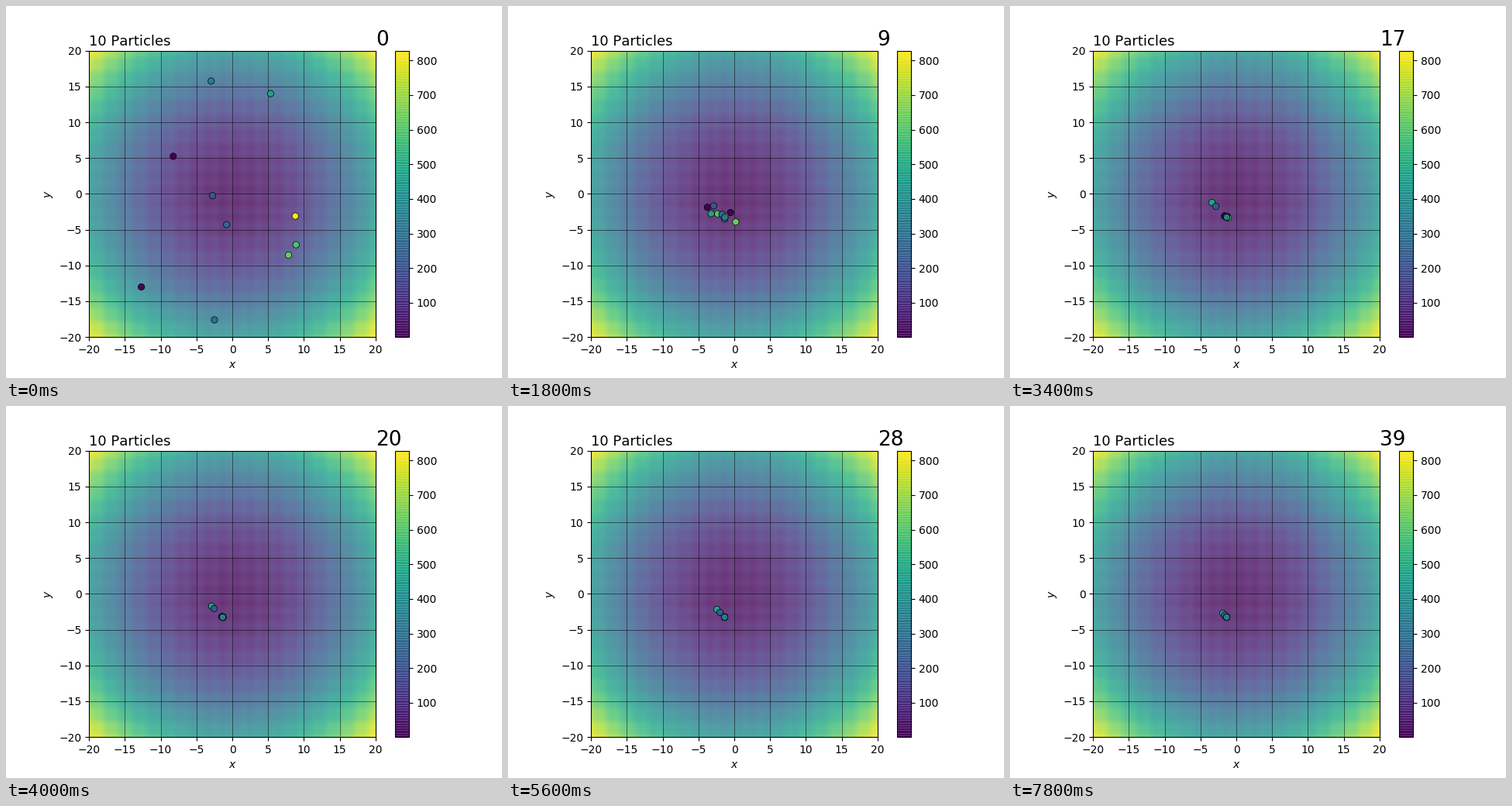
Write a matplotlib script that moves like this. It is 640x480 px and loops after 8000 ms.

```python
import numpy as np
import matplotlib.pyplot as plt
from matplotlib.animation import FuncAnimation

FRAMES, STEP_MS = 40, 200
LIMIT = 20
GOAL = np.array([-1.35, -3.25])
GATHER, SETTLE = 5, 17          # steps at which the two phases end
DIAGONAL = np.array([-1, 1])

# shade, start, offset from the goal after gathering
SWARM = [
    (1.00, (8.8, -3.1), (0.2, 0.15)),
    (0.01, (-12.7, -13.0), (1.35, 1.05)),
    (0.00, (-8.25, 5.25), (-3.95, 2.25)),
    (0.77, (7.85, -8.55), (2.55, -1.1)),
    (0.72, (8.9, -7.1), (-1.6, 0.75)),
    (0.33, (-0.8, -4.3), (-0.6, 0.65)),
    (0.58, (5.35, 14.0), (-2.4, 0.3)),
    (0.28, (-2.75, -0.25), (-1.55, 1.6)),
    (0.37, (-2.5, -17.6), (0.0, -0.4)),
    (0.42, (-2.95, 15.75), (0.05, -0.05)),
]
# late arrivals: index, mean distance, swing, decay time
STRAGGLERS = [(6, 1.45, 0.6, 45), (7, 1.5, 0.0, 13)]

shades = [shade for shade, _, _ in SWARM]
starts = np.array([start for _, start, _ in SWARM])
offsets = np.array([offset for _, _, offset in SWARM])


def ripple(v):
    return v ** 2 + 10 - 10 * np.sin(np.pi * (v - 0.1))


def sway(step, mean, swing, decay):
    late = step - SETTLE
    size = mean + swing * np.cos(2 * np.pi * late / 15)
    return size * np.exp(-max(late, 0) / decay) * DIAGONAL


def positions(step):
    if step < GATHER:
        eased = 1 - (1 - step / GATHER) ** 1.7
        return starts + eased * (GOAL + offsets - starts)
    spread = offsets * 0.5 ** ((step - GATHER) / 5) ** 1.5
    blend = min((step - GATHER) / (SETTLE - GATHER), 1)
    for i, *motion in STRAGGLERS:
        spread[i] = (1 - blend) * offsets[i] + blend * sway(step, *motion)
    return GOAL + spread


plt.rcParams["text.kerning_factor"] = 6
fig, ax = plt.subplots(figsize=(6.4, 4.8), dpi=100)
axis = np.linspace(-LIMIT, LIMIT, 400)
field = ripple(axis)[:, None] + ripple(axis)[None, :]
image = ax.imshow(field, extent=(-LIMIT, LIMIT, -LIMIT, LIMIT), origin="lower",
                  cmap="viridis", vmin=1, vmax=828.4, alpha=0.8)
bar = fig.colorbar(image, ax=ax, ticks=range(100, 801, 100))
# overlapping translucent edges give the bar its fine stripes
bar.solids.set(edgecolor="face", linewidth=0.7)

ticks = range(-LIMIT, LIMIT + 1, 5)
ax.set_xticks(ticks)
ax.set_yticks(ticks)
ax.grid(True, color="black", linewidth=0.5, alpha=0.7)
ax.set_xlabel("$x$")
ax.set_ylabel("$y$")

top = 1 + 6.6 / 369.6
ax.text(0, top, "10 Particles", transform=ax.transAxes, fontsize=13)
counter = ax.text(1, top, "0", transform=ax.transAxes, fontsize=19)
dots = ax.scatter(*positions(0).T, c=shades, cmap="viridis", vmin=0, vmax=1,
                  s=36, edgecolors="black", linewidths=0.5, zorder=3)


def update(step):
    dots.set_offsets(positions(step))
    counter.set_text(str(step))
    return dots, counter


anim = FuncAnimation(fig, update, frames=FRAMES, interval=STEP_MS,
                     repeat=True, repeat_delay=0)
plt.show()
```
